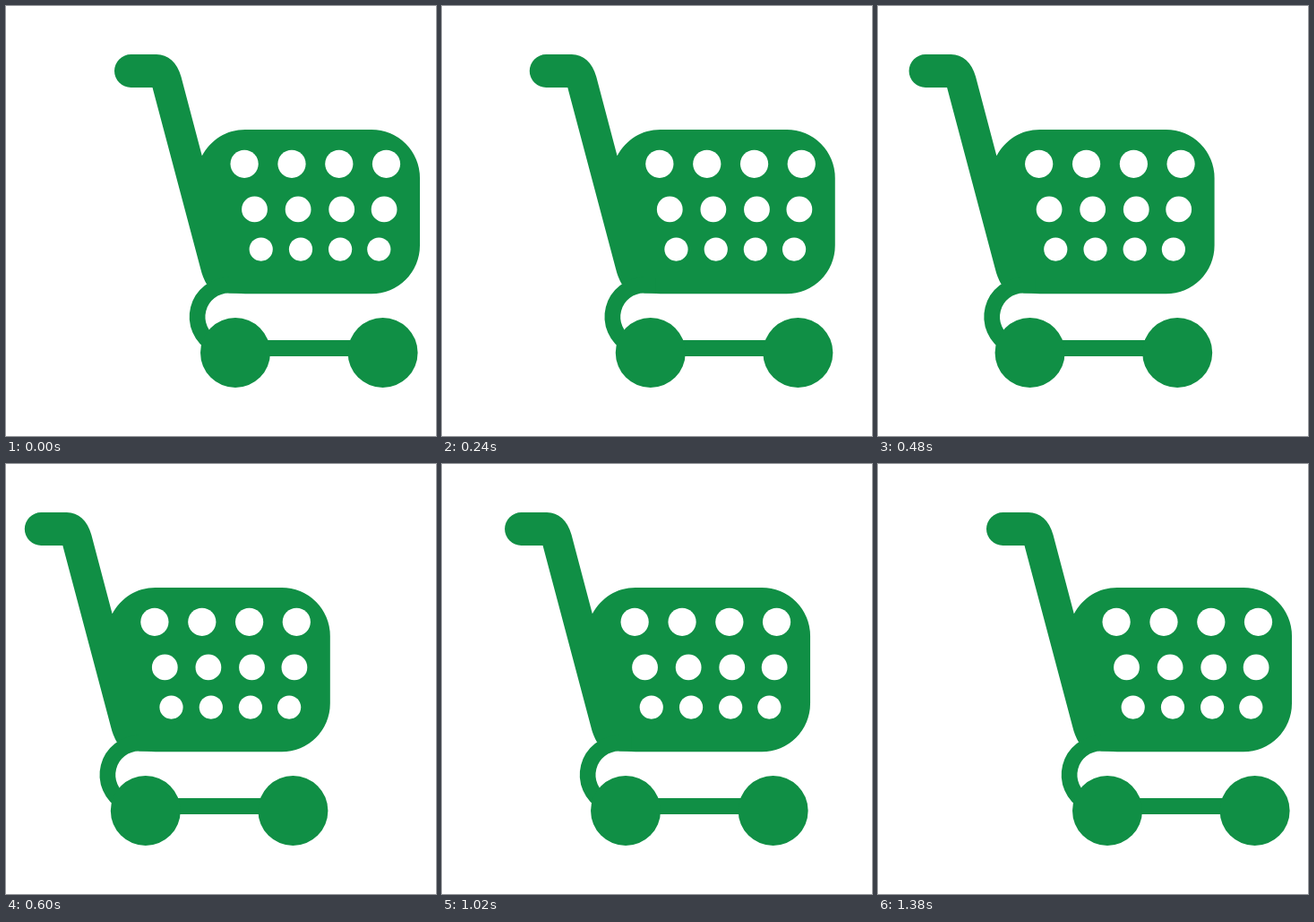
Recreate the animation shown at these times as an HTML page. Size 480 px wide and 480 px high, loop 1440 ms.

```html
<!DOCTYPE html>
<html lang="en">
<head>
<meta charset="utf-8">
<title>Shopping cart</title>
<style>
  html, body { margin: 0; width: 100%; height: 100%; overflow: hidden; background: #fff; }
  svg { display: block; width: 100vw; height: 100vh; }
</style>
</head>
<body>
<svg viewBox="0 0 480 480">
  <g id="cart" fill="#108f45">
    <path d="M139.5 54H168C181 54 191 63 195.5 79L218.8 167.3C229 149 246 138 267 138H408
      A54 54 0 0 1 462 192V267.300A54 54 0 0 1 408 321.300H267Q257 320.500 249 320.500L224 310.500
      Q219.500 303 217 292.500L163.500 91H139.500A18.500 18.500 0 0 1 139.500 54Z"/>
    <path d="M262 311.700H249A35.300 35.300 0 0 0 232 378" fill="none" stroke="#108f45" stroke-width="17.700"/>
    <path d="M280 373H400V391H280Z"/>
    <circle cx="256" cy="387" r="39"/>
    <circle cx="420.600" cy="387" r="39"/>
    <g id="holes" fill="#fff"></g>
  </g>
</svg>
<script>
  const LOOP = 1440, STEP = 60, TRAVEL = 100.2, MOVE = 528;
  const LEAVE = 75, RETURN = 759;
  const cart = document.getElementById('cart');

  const rows = [
    { y: 176.3, r: 15.6, xs: [266.1, 319, 371.8, 424.5] },
    { y: 226.9, r: 14.4, xs: [277.5, 326.1, 374.7, 422.1] },
    { y: 271.6, r: 13.1, xs: [284.7, 329, 373.1, 416.3] }
  ];
  document.getElementById('holes').innerHTML = rows.map(({ y, r, xs }) =>
    xs.map(x => `<circle cx="${x}" cy="${y}" r="${r}"/>`).join('')).join('');

  function ease(t, start) {
    const p = Math.min(1, Math.max(0, (t - start) / MOVE));
    return p * p * (3 - 2 * p);
  }

  function draw(now) {
    const t = Math.floor((now % LOOP) / STEP) * STEP;
    const x = TRAVEL * (ease(t, RETURN) - ease(t, LEAVE));
    cart.setAttribute('transform', `translate(${x.toFixed(2)} 0)`);
  }

  let begin;
  function tick(now) {
    begin ??= now;
    draw(now - begin);
    requestAnimationFrame(tick);
  }
  draw(0);
  requestAnimationFrame(tick);
</script>
</body>
</html>
```
